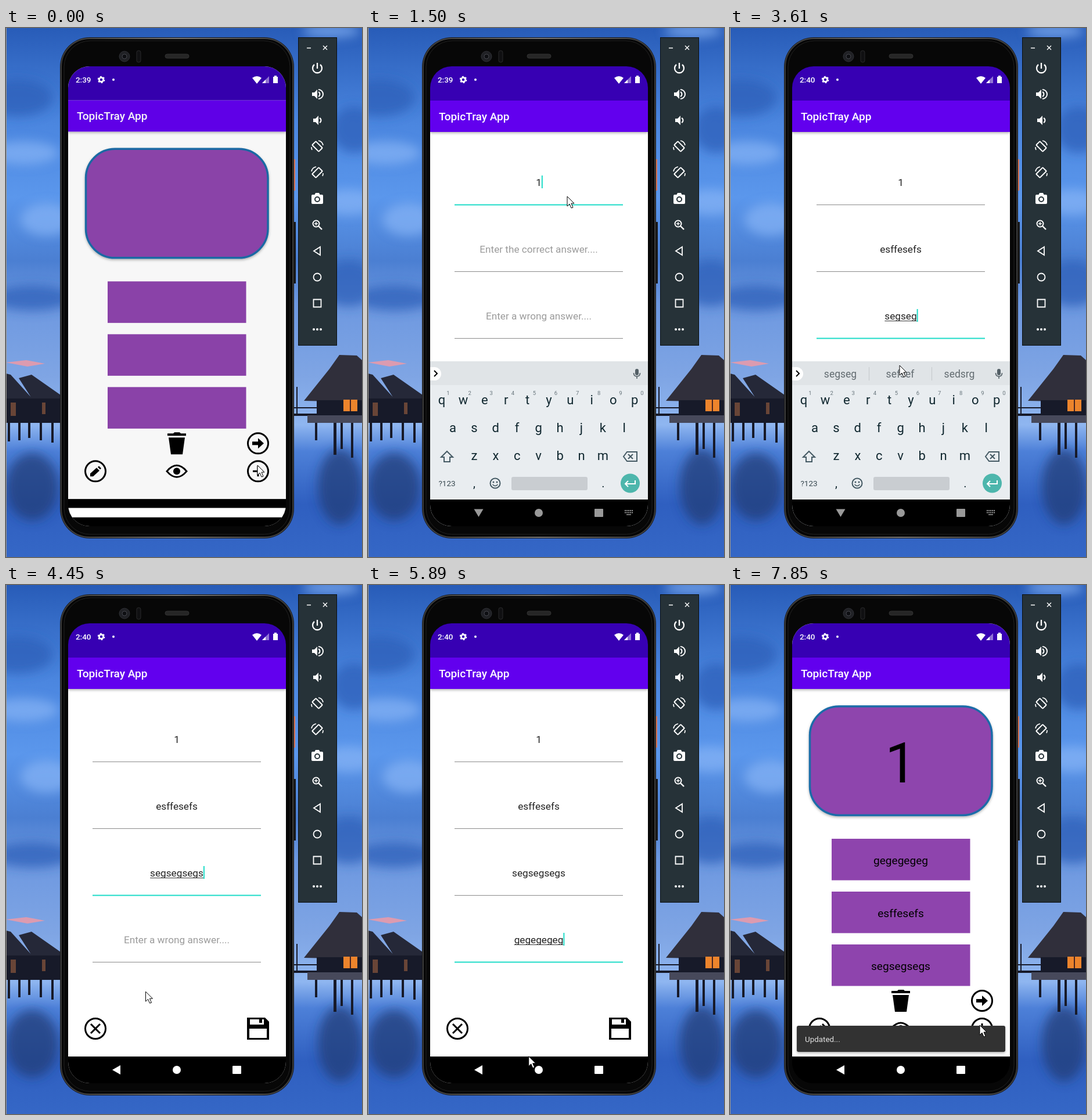
Animation of 613x911 px, one loop 8000 ms. Source, as an HTML page:

```html
<!DOCTYPE html>
<html lang="en">
<head>
<meta charset="utf-8">
<title>Card editor demo</title>
<style>
html, body { margin: 0; width: 100%; height: 100%; overflow: hidden; }
svg { display: block; width: 100vw; height: 100vh; }
text { font-family: Roboto, "Noto Sans", sans-serif; white-space: pre; }
.mid { text-anchor: middle; }
.line { fill: none; stroke: currentColor; stroke-width: 2; }
</style>
</head>
<body>
<svg viewBox="0 0 613 911">
  <defs>
    <linearGradient id="sky" x2="0" y2="1">
      <stop offset="0" stop-color="#285cb8"/><stop offset=".18" stop-color="#4b86df"/>
      <stop offset=".32" stop-color="#5b97ec"/><stop offset=".44" stop-color="#4b7fd2"/>
      <stop offset=".52" stop-color="#6d98e0"/><stop offset=".66" stop-color="#7fa5e4"/>
      <stop offset=".75" stop-color="#8fb6f0"/><stop offset=".8" stop-color="#4d80d8"/>
      <stop offset=".9" stop-color="#2f5fc0"/><stop offset="1" stop-color="#3567c6"/>
    </linearGradient>
    <linearGradient id="rim"><stop stop-color="#3a3a3a"/><stop offset=".5" stop-color="#777"/><stop offset="1" stop-color="#3a3a3a"/></linearGradient>
    <filter id="soft" x="-50%" y="-50%" width="200%" height="200%"><feGaussianBlur stdDeviation="9"/></filter>
    <filter id="drop" x="-10%" y="-10%" width="120%" height="125%"><feDropShadow dx="0" dy="2" stdDeviation="2" flood-opacity=".3"/></filter>
    <clipPath id="screen"><rect x="107" y="66" width="375" height="792" rx="37"/></clipPath>
  </defs>

  <rect width="613" height="911" fill="url(#sky)"/>
  <g filter="url(#soft)">
    <g fill="#86b4f6" opacity=".7">
      <ellipse cx="30" cy="215" rx="60" ry="20"/><ellipse cx="70" cy="330" rx="45" ry="28"/>
      <ellipse cx="590" cy="300" rx="50" ry="22"/><ellipse cx="560" cy="5" rx="50" ry="12"/>
    </g>
    <g fill="#2c5fb8" opacity=".75">
      <ellipse cx="20" cy="120" rx="60" ry="32"/><ellipse cx="45" cy="465" rx="70" ry="22"/>
      <ellipse cx="600" cy="175" rx="40" ry="40"/><ellipse cx="590" cy="440" rx="50" ry="40"/>
    </g>
    <g fill="#1f3c78" opacity=".75">
      <ellipse cx="45" cy="790" rx="45" ry="58"/><ellipse cx="575" cy="790" rx="38" ry="65"/>
    </g>
  </g>
  <path d="M0 576l35-4 32 6-30 5z" fill="#dc9bb0"/>
  <g fill="#171a29">
    <path d="M0 595l8 2 38 42H0zM22 603l22-6 60 42H45z" fill="#252838"/>
    <path d="M0 638h93v42H0z"/>
    <path d="M3 680h4v32h-4zm18 0h4v30h-4zm17 0h4v26h-4zm20 0h4v30h-4zm20 0h4v34h-4z"/>
    <path d="M496 653h40v2h-40zm0 11h40v4h-40zm4-46h2v50h-2z"/>
    <path d="M513 642l44-55 17-24 30 1 9 8v72z" fill="#302f3b"/>
    <path d="M535 641h78v28h-78z"/>
    <path d="M519 667h94v13h-94z" fill="#47495b"/>
    <path d="M532 680h4v30h-4zm32 0h5v55h-5zm12 0h4v45h-4zm18 0h4v60h-4z"/>
  </g>
  <path d="M581 640h24v20h-24z" fill="#ec842c"/>
  <path d="M592 640h2v20h-2z" fill="#422"/>
  <path d="M8 645h9v23h-9zm54 0h6v20h-6z" fill="#694537"/>
  <path d="M.5 0v911" stroke="#9c978f"/>

  <path d="M494 226h4v54h-4z" fill="#e07958"/>
  <path d="M494 334h5v106h-5z" fill="#181818"/>
  <rect x="93" y="16" width="403" height="863" rx="51" fill="#1a1a1a"/>
  <rect x="95" y="18" width="399" height="859" rx="49" fill="#060606" stroke="url(#rim)" stroke-width="2"/>
  <rect x="100" y="22" width="389" height="850" rx="45" fill="#070707" stroke="#222"/>
  <circle cx="204" cy="49" r="9" fill="#202125" stroke="#303136"/><circle cx="204" cy="49" r="4" fill="#0d0e12" stroke="#45464d"/>
  <rect x="225" y="39" width="7" height="20" rx="3" fill="#101012" stroke="#29292b"/>
  <rect x="274" y="45" width="41" height="7" rx="3.5" fill="#262626" stroke="#333"/>

  <g clip-path="url(#screen)">
    <path d="M107 66h375v792H107z"/>
    <g id="view"></g>
    <g fill="#fff" stroke="none">
      <text id="clock" x="120" y="94" font-size="13.4" font-weight="500"></text>
      <g fill="none" stroke="#fff"><circle cx="164" cy="89" r="3.6" stroke-width="2.6"/><circle cx="164" cy="89" r="5.3" stroke-width="2" stroke-dasharray="2.8 2.75"/></g>
      <circle cx="185" cy="89" r="2"/>
      <path d="M424 86q8-6 16 0l-8 10zM460 84h2v-2h4v2h2v11h-8z"/>
      <path d="M453 83v12h-12z" opacity=".45"/><path d="M447 89v6h-6z"/>
    </g>
  </g>

  <rect x="503.500" y="16.500" width="66" height="530" fill="#263238" stroke="#0b0f11"/>
  <g id="tools" color="#fff" fill="#fff"></g>
  <path id="mouse" d="M0 0v17l4-4 3 7 3-1-3-7h5z" fill="#fff" stroke="#000"/>
</svg>
<script>
const $ = id => document.getElementById(id);
const LOOP = 8000;
const APP = 'TopicTray App';
const TEAL = '#1fdcc8';
const FIELD_Y = [272, 387, 502, 617];
const HINTS = ['Enter a new question....', 'Enter the correct answer....', 'Enter a wrong answer....', 'Enter a wrong answer....'];
const ANSWERS = ['gegegegeg', 'esffesefs', 'segsegsegs'];

// [start, number of equal holds until the next start]
const HOLDS = [[0, 1], [120, 4], [660, 4], [1230, 1], [1500, 1], [1750, 6], [2560, 8], [3610, 8],
  [4750, 2], [5050, 6], [5890, 5], [6580, 3], [7000, 6], [7850, 1], [LOOP, 1]];
// [time, x, y] of the pointer
const MOUSE = [[0, 433, 753], [120, 430, 740], [660, 369, 355], [960, 343, 290], [1750, 343, 290],
  [2010, 318, 380], [2600, 318, 380], [2900, 300, 490], [3100, 296, 520], [3480, 292, 581], [3750, 292, 581],
  [4080, 190, 832], [4180, 190, 832], [4420, 275, 610], [4600, 275, 620], [4900, 270, 725], [5300, 270, 725],
  [5560, 190, 838], [5700, 190, 838], [6250, 441, 762], [6850, 441, 762], [7500, 430, 758], [LOOP, 430, 758]];

const clamp = v => Math.max(0, Math.min(1, v));
const lerp = (a, b, u) => a + (b - a) * u;
const ramp = (t, a, b) => clamp((t - a) / (b - a));

// Fast-out, slow-in: cubic Bezier .4, 0, .2, 1
function ease(u) {
  let s = 0;
  while (s < 1 && 1.2 * (1 - s) ** 2 * s + .6 * (1 - s) * s * s + s ** 3 < u) s += .005;
  return clamp(3 * (1 - s) * s * s + s ** 3);
}
const slide = (t, a, b) => ease(ramp(t, a, b));

function hold(t) {
  const i = HOLDS.findIndex((h, k) => t < HOLDS[k + 1][0]);
  const [start, n] = HOLDS[i], step = (HOLDS[i + 1][0] - start) / n;
  return start + Math.floor((t - start) / step) * step;
}

const pen = document.createElement('canvas').getContext('2d');
function width(str, size) {
  pen.font = `${size}px Roboto, "Noto Sans", sans-serif`;
  return pen.measureText(str).width;
}

const rect = (x, y, w, h, fill, extra = '') => `<rect x="${x}" y="${y}" width="${w}" height="${h}" fill="${fill}" ${extra}/>`;
const text = (x, y, str, size, fill, extra = 'class="mid"') => `<text x="${x}" y="${y}" font-size="${size}" fill="${fill}" ${extra}>${str}</text>`;
const path = (d, fill = 'currentColor') => `<path d="${d}" fill="${fill}"/>`;
const line = (d, w = 2) => `<path class="line" d="${d}" style="stroke-width:${w}"/>`;
const ring = (x, y, r, w = 2) => `<circle class="line" cx="${x}" cy="${y}" r="${r}" style="stroke-width:${w}"/>`;
const group = (x, y, inner, extra = '') => `<g transform="translate(${x} ${y})" ${extra}>${inner}</g>`;

const disc = (x, y, inner) => group(x, y, ring(0, 0, 17.5, 3) + inner);
const statusBg = () => rect(107, 60, 375, 65, '#3700b3');
const appBar = () => rect(107, 125, 375, 54, '#6200ee', 'filter="url(#drop)"') +
  text(122, 159, APP, 19.1, '#fff', 'font-weight="500"');

function mainScreen(filled) {
  let s = rect(107, 66, 375, 746, '#fff') + appBar() + statusBg() +
    rect(137.500, 209, 313.500, 187.500, '#8e44ad', 'rx="50" stroke="#1b6ca8" stroke-width="3.500" filter="url(#drop)"');
  if (filled) s += text(294, 340, '1', 95.5, '#000');
  ANSWERS.forEach((a, i) => {
    const y = 437 + 91 * i;
    s += rect(175, y, 238.500, 71.500, '#8e44ad');
    if (filled) s += text(294, y + 44, a, 19.1, '#000');
  });
  return s + path('M278 699h10l2-2h9l2 2h9v4h-32zM280 706h28l-4 29h-20z') +
    disc(434, 716, path('M-10-3H0v-6L10 0 0 9V3h-10z')) +
    disc(434, 764, line('M-9 0H9M0-9V9', 3)) +
    disc(154, 764, path('M-9 9v-5L2-6l5 5L-4 9zM4-7l2-2 4 4-2 2z')) +
    group(294, 764, line('M-17 0Q0-20 17 0 0 20-17 0z', 3) + '<circle r="6"/>') +
    rect(107, 812, 375, 46, '#000');
}

function editScreen(values, focus, pan) {
  let s = rect(107, 125, 375, 800, '#fff') + appBar();
  FIELD_Y.forEach((y, i) => {
    const v = values[i], on = i === focus, w = v ? width(v, 17.2) : 0;
    s += text(294, y, v || HINTS[i], 17.2, v ? '#222' : '#9b9b9b');
    if (on) {
      if (i && v) s += rect(294 - w / 2, y + 2, w, 1, '#333');
      s += rect(v ? 294 + w / 2 : 204, y - 18, 2, 22, TEAL);
    }
    s += rect(149, y + (on ? 31.5 : 32), 290, on ? 2 : 1, on ? TEAL : '#8a8a8a');
  });
  s += disc(154, 764, line('M-8-8L8 8M8-8L-8 8', 3)) +
    path('M415 745h31l7 7v31h-38zM420 748v9h24v-9h-3v6h-5v-6zM419 764v16h30v-16z').replace('/>', ' fill-rule="evenodd"/>');
  return group(0, -pan, s) + statusBg() + rect(107, 812, 375, 46, '#000');
}

function suggestions(word, field) {
  if (!word || field < 1) return '';
  const words = [[word, 'effects', 'offers'], [word, 'sefsef', 'sedsrg'], [word, 'get', 'Dalo']][field - 1];
  return words.map((w, i) => text([190, 293, 395][i], 602, w, 17.5, field === 3 && i === 1 ? '#000' : '#626b70',
    `class="mid" font-weight="${field === 3 && i === 1 ? 700 : 400}"`)).join('') +
    rect(239, 584, 1, 23, '#c3c8cb') + rect(347, 584, 1, 23, '#c3c8cb');
}

function keyboard(word, field) {
  let s = rect(107, 574, 375, 290, '#e9edf0') + rect(107, 574, 375, 41, '#e0e4e7') +
    '<rect x="97" y="584" width="29" height="23" rx="11.500" fill="#fff"/>' + line('M114 590l5 5-5 5') +
    suggestions(word, field) +
    rect(460, 587, 6, 11, '#546067', 'rx="3"') + `<g color="#546067">${line('M457.500 594q0 6 5.500 6t5.500-6M463 600v4', 1.6)}</g>`;
  [['qwertyuiop', 127, 648], ['asdfghjkl', 146, 696], ['zxcvbnm', 183, 744]].forEach(([keys, x, y], row) => {
    [...keys].forEach((k, i) => {
      s += text(x + 36.9 * i, y, k, 22, '#10272f');
      if (!row) s += text(x + 11 + 37.1 * i, 632, (i + 1) % 10, 9.5, '#66737a');
    });
  });
  return s + '<g color="#455a64" fill="#455a64">' +
    line('M136 729l10 10h-5v8h-10v-8h-5z') +
    line('M446 730h17v16h-17l-6-8zM448 734l8 8M456 734l-8 8') +
    ring(219, 784, 8.5) + '<circle cx="216" cy="782" r="1.500"/><circle cx="222" cy="782" r="1.500"/>' +
    line('M214.500 786q4.500 5 9 0', 1.6) + '</g>' +
    text(136, 789, '?123', 13.5, '#37474f') + text(183, 791, ',', 20, '#10272f') + text(405, 791, '.', 20, '#10272f') +
    rect(247, 773, 131, 23, '#c9cdd1', 'rx="3"') +
    '<circle cx="451.500" cy="784" r="16.500" fill="#4db6ac"/>' +
    `<g color="#fff">${line('M460 779v6h-17M448 780l-5 5 5 5')}</g>`;
}

function navIcons(color, open) {
  let s = open ? path('M182.500 828.500h16l-8 13.500z') : path('M197 827v16l-14-8z');
  s += '<circle cx="294" cy="835" r="7" fill="currentColor"/>' + rect(390, 828, 15, 14, 'currentColor', 'rx="1"');
  if (open) s += line('M442 831h14M442 834.500h14', 2).replace('style="', 'stroke-dasharray="2 1" style="') + line('M445 838h8', 1.5);
  return `<g color="${color}">${s}</g>`;
}

function snackbar(t) {
  const y = 54 * (1 - slide(t, 6650, 6840));
  return t < 6660 ? '' : group(0, y, rect(115, 759, 359, 45, '#323232', 'rx="3" filter="url(#drop)"') +
    text(129, 787, 'Updated...', 13.4, '#e2e2e2', `opacity="${ramp(t, 6850, 7130)}"`)) + rect(107, 812, 375, 46, '#000');
}

function typed(t, str, a, b) {
  return str.slice(0, Math.round(str.length * ramp(t, a, b)));
}

function scene(t) {
  const openU = ramp(t, -50, 375), closeU = ramp(t, 6376, 6801);
  const open = ease(openU), close = ease(closeU), drift = closeU ** 2;
  const closing = closeU > 0;
  const values = [t >= 1500 ? '1' : '', typed(t, 'esffesefs', 2080, 2700),
    typed(t, 'segsegsegs', 3080, 3960), typed(t, 'gegegegeg', 4800, 5500)];
  const focus = t < 900 ? -1 : t < 2000 ? 0 : t < 2900 ? 1 : t < 4430 ? 2 : 3;
  const kb = slide(t, 900, 1180) - slide(t, 4080, 4330) + slide(t, 4430, 4680) - slide(t, 5600, 5800);
  const pan = 67 * (slide(t, 4620, 4900) - slide(t, 5600, 5780));
  let s = '';
  if (open < 1 || closing) {
    const y = closing ? -16 * (1 - drift) : -16 * open;
    const dim = closing ? .12 * (1 - drift) : Math.min(.1, openU * .25);
    s += group(0, y, mainScreen(closing)) + rect(107, 66, 375, 792, '#000', `opacity="${dim}"`);
  }
  if (close < 1) {
    const top = 66 + 792 * (closing ? close : 1 - open);
    const y = closing ? 32 * drift : 32 * (1 - open);
    s += `<clipPath id="reveal">${rect(107, top, 375, 800, '#000')}</clipPath><g clip-path="url(#reveal)">` +
      group(0, y, editScreen(values, focus, pan)) + '</g>';
  }
  if (kb > .01) s += group(0, 284 * (1 - kb), keyboard(values[focus], focus)) + rect(107, 812, 375, 46, '#000');
  s += snackbar(t);
  if (t >= 120) s += navIcons(t < 4080 ? '#999' : '#fff', kb > .5);
  return s;
}

const TOOLS = [
  line('M-5-6a8 8 0 1 0 10 0M0-9V1', 2.3),
  path('M-9-3h4l5-5V8l-5-5h-4z') + line('M2-4a4.500 4.500 0 0 1 0 8M2-8a8 8 0 0 1 0 16'),
  path('M-7-3h4l5-5V8l-5-5h-4z') + line('M4-4a4.500 4.500 0 0 1 0 8'),
  '<rect class="line" x="-4.500" y="-8" width="9" height="16" rx="1" transform="rotate(-45)"/>' + line('M2-10a10 10 0 0 1 8 8M-10 1a10 10 0 0 0 1 5', 1.6),
  '',
  rect(-10, -7, 20, 16, '#fff', 'rx="2"') + path('M-5-6l2-4h6l2 4z') + '<circle cy="1" r="4" fill="#fff" stroke="#263238" stroke-width="2"/>',
  ring(-2, -2, 5.5) + line('M2 2l6 6', 2.4) + line('M-5-2h6M-2-5v6', 1.4),
  line('M5-7V7L-6 0z', 1.8), ring(0, 0, 6.5, 1.8), line('M-6.500-6.500h13v13h-13z', 1.8),
  '<circle cx="-6" r="2"/><circle r="2"/><circle cx="6" r="2"/>'
];
TOOLS[4] = `<g transform="scale(-1 1)">${TOOLS[3]}</g>`;
$('tools').innerHTML = line('M518 34.500h7M546 30.500l7 7M553 30.500l-7 7', 1.4) +
  TOOLS.map((icon, i) => group(536, 69 + 45 * i, icon)).join('');

let shown = -1;
function draw() {
  const t = hold(performance.now() % LOOP);
  if (t !== shown) {
    shown = t;
    $('view').innerHTML = scene(t);
    $('clock').textContent = t < 2950 ? '2:39' : '2:40';
    const i = MOUSE.findIndex((m, k) => t < MOUSE[k + 1][0]);
    const [a, x, y] = MOUSE[i], [b, x2, y2] = MOUSE[i + 1], u = ramp(t, a, b);
    $('mouse').setAttribute('transform', `translate(${lerp(x, x2, u)} ${lerp(y, y2, u)})`);
  }
  requestAnimationFrame(draw);
}
draw();
</script>
</body>
</html>
```
